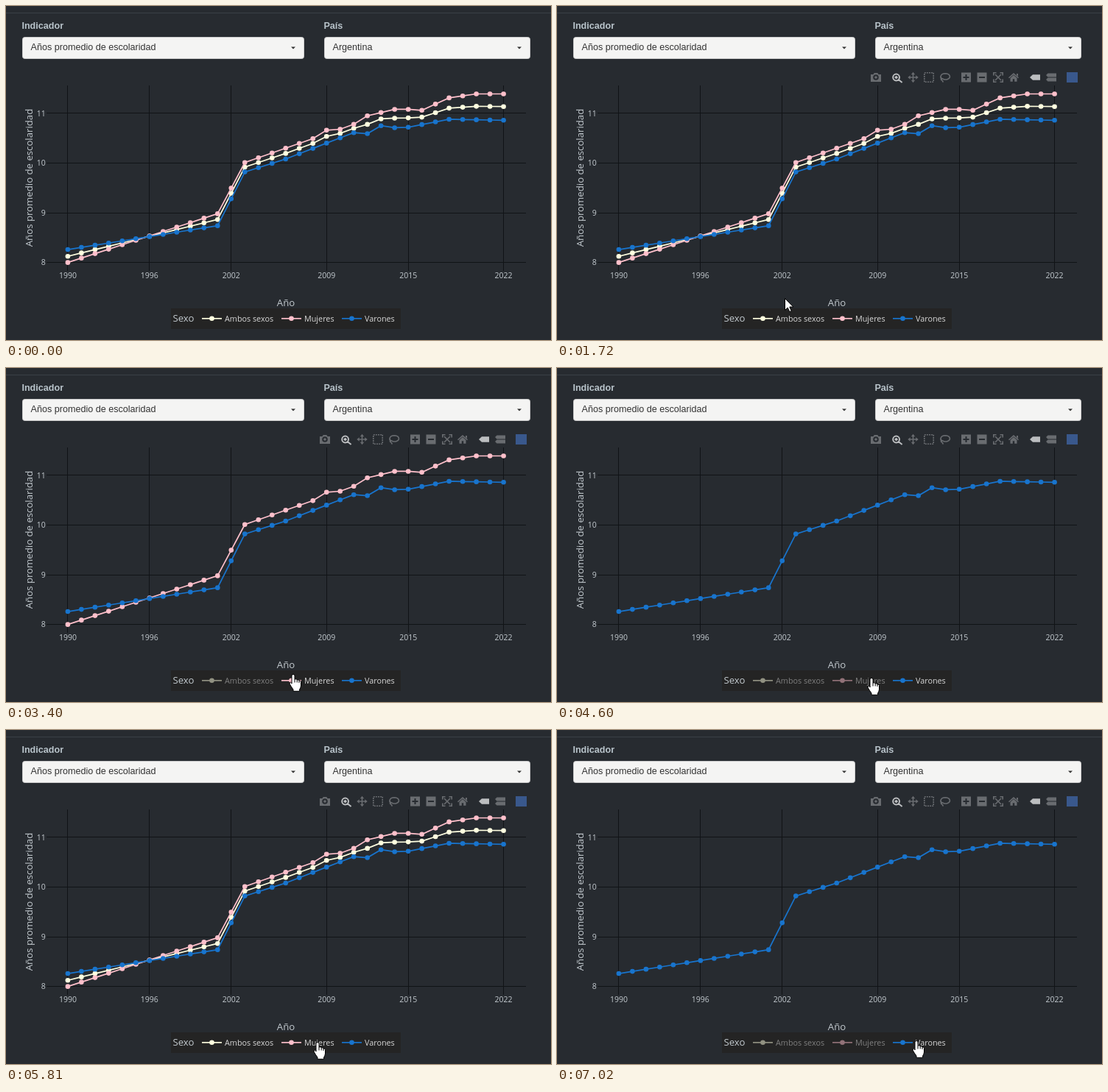
An HTML page that plays this animation: 740x454 px, repeating every 8000 ms.

```html
<!DOCTYPE html>
<html lang="es">
<head>
<meta charset="utf-8">
<title>Años promedio de escolaridad</title>
<style>
  html, body { margin: 0; width: 100%; height: 100%; overflow: hidden; background: #272b30; }
  svg { display: block; width: 100vw; height: 100vh; }
  text { font-family: "Open Sans", sans-serif; fill: #c3cacf; }
  .form { font: 12.6px "Liberation Sans", Arial, sans-serif; fill: #333; }
  .label { font-weight: bold; fill: #b9c4cb; }
  .tick { font-size: 10.5px; }
  .title { font-size: 13.2px; }
  .item { font-size: 10.8px; fill: #d8d8d8; }
  .grid { stroke: #101316; }
  .icon { fill: #696c70; }
  .wire { fill: none; stroke: #696c70; stroke-width: 1.6; }
  .cut { fill: none; stroke: #272b30; stroke-width: 2; }
  .on { fill: #bcbec0; }
  .onWire { fill: none; stroke: #bcbec0; stroke-width: 2; }
  .pointer { fill: #fff; stroke: #000; stroke-linejoin: round; }
</style>
</head>
<body>
<svg viewBox="0 0 740 454">
  <rect width="740" height="454" fill="#272b30"/>
  <path d="M0 9.5H740" stroke="#3a4046"/>
  <g id="form"></g>
  <g id="axes"></g>
  <g id="lines"></g>
  <rect x="224" y="411" width="312" height="28" fill="#242424"/>
  <text class="title" x="226.5" y="429">Sexo</text>
  <g id="legend"></g>
  <g id="tools"></g>
  <circle id="click" r="14" fill="#ff0" fill-opacity=".47"/>
  <g id="cursor">
    <path id="arrow" class="pointer" d="M.5 .5V16.500L4.200 13L6.800 18.600L9.300 17.500L6.800 12H11.800Z"/>
    <g id="hand" transform="translate(-2 -1)">
      <path class="pointer" d="M-2 13V2Q-2 .5 0 .5T2 2V7Q5 6 5.200 8Q8 7 8 9Q10.500 8.500 10.500 10.500V16Q10 19 8.600 21V23.300H0V21Q-3 17 -4.800 13.500Q-5 11 -3.600 11Q-2.600 11.500 -2 13Z"/>
      <path d="M2 7v4.500M5.200 8v3.500M8 9v3" stroke="#000"/>
    </g>
  </g>
</svg>

<script>
const LOOP = 8000, STEP = 66.7;
const FIRST = 1990, LAST = 2022;
const $ = id => document.getElementById(id);

function add(parent, tag, attrs, text) {
  const el = document.createElementNS("http://www.w3.org/2000/svg", tag);
  for (const k in attrs) el.setAttribute(k, attrs[k]);
  if (text) el.textContent = text;
  parent.appendChild(el);
  return el;
}

// Straight interpolation between keys of the form [position, ...values]
function between(keys, at) {
  const last = keys[keys.length - 1];
  if (at <= keys[0][0]) return keys[0].slice(1);
  if (at >= last[0]) return last.slice(1);
  const i = keys.findIndex(key => key[0] > at);
  const a = keys[i - 1], b = keys[i];
  const k = (at - a[0]) / (b[0] - a[0]);
  return a.slice(1).map((v, j) => v + (b[j + 1] - v) * k);
}

const yearX = year => 83.9 + (year - FIRST) * 18.49;
const valueY = v => 348.65 - (v - 8) * 67.6;

function addSelect(x, width, label, value) {
  const g = $("form");
  add(g, "text", { class: "form label", x: x - .6, y: 31 }, label);
  add(g, "rect", { x: x + .5, y: 42.5, width: width - 1, height: 29, rx: 3, fill: "#f4f4f3", stroke: "#ccc" });
  add(g, "text", { class: "form", x: x + 11.5, y: 60 }, value);
  add(g, "path", { d: `M${x + width - 18} 55.5h6l-3 3z`, fill: "#333" });
}
addSelect(22, 383, "Indicador", "Años promedio de escolaridad");
addSelect(432, 280, "País", "Argentina");

const axes = $("axes");
for (let v = 8; v <= 11; v++) {
  const y = valueY(v);
  add(axes, "path", { class: "grid", d: `M55 ${Math.floor(y) + .5}H706` });
  add(axes, "text", { class: "tick", x: 53.8, y: y + 3.8, "text-anchor": "end" }, v);
}
for (const year of [1990, 1996, 2002, 2009, 2015, 2022]) {
  const x = yearX(year);
  add(axes, "path", { class: "grid", d: `M${Math.floor(x) + .5} 108V360` });
  add(axes, "text", { class: "tick", x, y: 370, "text-anchor": "middle" }, year);
}
add(axes, "text", { class: "title", x: 380, y: 408, "text-anchor": "middle" }, "Año");
add(axes, "text", { class: "title", "text-anchor": "middle", transform: "translate(36 233.5) rotate(-90)" },
  "Años promedio de escolaridad");

// Years of schooling at the bends of each curve
const womenKeys = [
  [1990, 8], [2001, 8.98], [2003, 10.01], [2008, 10.49], [2009, 10.66], [2010, 10.68], [2011, 10.78],
  [2012, 10.95], [2014, 11.08], [2015, 11.08], [2016, 11.06], [2018, 11.31], [2020, 11.39]
];
const menKeys = [
  [1990, 8.26], [2001, 8.74], [2003, 9.82], [2006, 10.08], [2009, 10.4], [2011, 10.61],
  [2012, 10.59], [2013, 10.75], [2014, 10.71], [2015, 10.72], [2018, 10.88], [2022, 10.86]
];
const women = year => between(womenKeys, year)[0];
const men = year => between(menKeys, year)[0];
const both = year => .52 * women(year) + .48 * men(year);

// Clicks drop one series at a time, a double click restores all, another isolates the last.
const RESTORE = 5280, ISOLATE = 7020;
const series = [
  { name: "Ambos sexos", color: "#ffffe0", value: both, x: 266, hideAt: 2940 },
  { name: "Mujeres", color: "#ffc0cb", value: women, x: 374, hideAt: 4190 },
  { name: "Varones", color: "#1874cd", value: men, x: 456, hideAt: Infinity }
];
const isHidden = (s, t) => s.hideAt < LOOP && (t >= s.hideAt && t < RESTORE || t >= ISOLATE);

for (const s of series) {
  const dot = (parent, cx, cy) => add(parent, "circle", { cx, cy, r: 3.3, fill: s.color });
  const line = (parent, d) => add(parent, "path", { d, fill: "none", stroke: s.color, "stroke-width": 1.7 });
  const points = [];
  for (let year = FIRST; year <= LAST; year++) points.push([yearX(year), valueY(s.value(year))]);

  s.plot = add($("lines"), "g", {});
  line(s.plot, "M" + points.join("L"));
  for (const [x, y] of points) dot(s.plot, x, y);

  s.key = add($("legend"), "g", {});
  line(s.key, `M${s.x} 424.8h27`);
  dot(s.key, s.x + 13.5, 424.8);
  add(s.key, "text", { class: "item", x: s.x + 31, y: 429 }, s.name);
}

// Toolbar icons, each drawn around its own centre as [class, path] layers
function addIcon(x, ...layers) {
  const g = add($("tools"), "g", { transform: `translate(${x} 97)` });
  for (const [cls, d] of layers) add(g, "path", { class: cls, d });
  return g;
}
function addTurned(x, cls, d) {
  const g = addIcon(x);
  for (let a = 0; a < 360; a += 90) add(g, "path", { class: cls, d, transform: `rotate(${a})` });
}
const ring = r => `M${-r} 0a${r} ${r} 0 1 0 ${2 * r} 0a${r} ${r} 0 1 0 ${-2 * r} 0`;
const box = "M-6.5 -6.5h13v13h-13z", minus = "M-4 0h8";

addIcon(433, ["icon", "M-7 -4h3.5l1.2-2h4.6l1.2 2h3.5v10h-14z"], ["cut", ring(2.8)]);
addIcon(460.6, ["onWire", ring(4.4) + "M3 3l5 4M-2 0h4M0 -2v4"]);
addTurned(483.5, "icon", "M0 -7.2l2.7 3.4h-1.9v3.8h-1.6v-3.8h-1.9z");
addIcon(505, ["wire", "M-6.2 -6.2h12.4v12.4h-12.4z"]).firstChild.setAttribute("stroke-dasharray", "2 1.1");
addIcon(527, ["wire", "M-4 2.500c-3.500-2-2.600-7.500 4-7.800c7 0 8.500 6 3.400 7.700c-2.300 .8-5 .7-6.800-.6c-1.500-1-3 .8-1.500 1.800c1.500 .8 2.400 1.400 1.600 3"]);
addIcon(555.5, ["icon", box], ["cut", minus + "M0 -4v8"]);
addIcon(577, ["icon", box], ["cut", minus]);
addTurned(599, "wire", "M-6.2 -2.5v-3.7h3.7M0 0l-4 -4");
addIcon(620, ["icon", "M0 -6l7 6.200-1 1-6-5-6 5-1-1zM4 -5h2v4l-2-2zM-4.500 1l4.500-4 4.500 4v4.700h-3.300v-3.400h-2.400v3.400h-3.300z"]);
addIcon(649, ["on", "M-7 0l4-3.800h10v7.600h-10z"]);
addIcon(671, ["icon", "M-7 -3l2.500-2.500h11.500v5h-11.500zM-7 3l2.500-2.500h11.500v5h-11.500z"]);
add($("tools"), "rect", { x: 692, y: 90, width: 15, height: 14, fill: "#39588c" });

// Pointer stops: time, x, y
const ENTER = 520;
const stops = [
  [ENTER, 322, 448], [900, 326, 372], [1390, 334, 322], [1720, 310, 396], [1920, 291, 412], [2260, 303, 427],
  [3130, 303, 427], [3400, 392, 417], [3660, 402, 417], [4400, 402, 417], [4600, 429, 422], [4730, 420, 425],
  [5740, 420, 425], [5800, 424, 425], [6090, 490, 423]
];
const clicks = [[2600, 2740], [3810, 3880], [4940, 5010], [5150, RESTORE], [6750, 6820], [6950, ISOLATE]];
const show = (el, on) => el.setAttribute("visibility", on ? "visible" : "hidden");

function render(t) {
  for (const s of series) {
    const off = isHidden(s, t);
    show(s.plot, !off);
    s.key.setAttribute("opacity", off ? .5 : 1);
  }

  const held = Math.floor(t / STEP + .25) * STEP;
  const fade = Math.min(1, Math.max(0, (held - ENTER - 40) / 300));
  $("tools").setAttribute("opacity", fade * (2 - fade));

  const [x, y] = between(stops, held).map(Math.round);
  const present = t >= ENTER;
  const overLegend = y >= 416 && y < 439;
  $("cursor").setAttribute("transform", `translate(${x} ${y})`);
  show($("hand"), present && overLegend);
  show($("arrow"), present && !overLegend);
  $("click").setAttribute("cx", x);
  $("click").setAttribute("cy", y);
  show($("click"), clicks.some(([from, to]) => t >= from && t < to));
}

function tick() {
  render(performance.now() % LOOP);
  requestAnimationFrame(tick);
}
tick();
</script>
</body>
</html>
```
